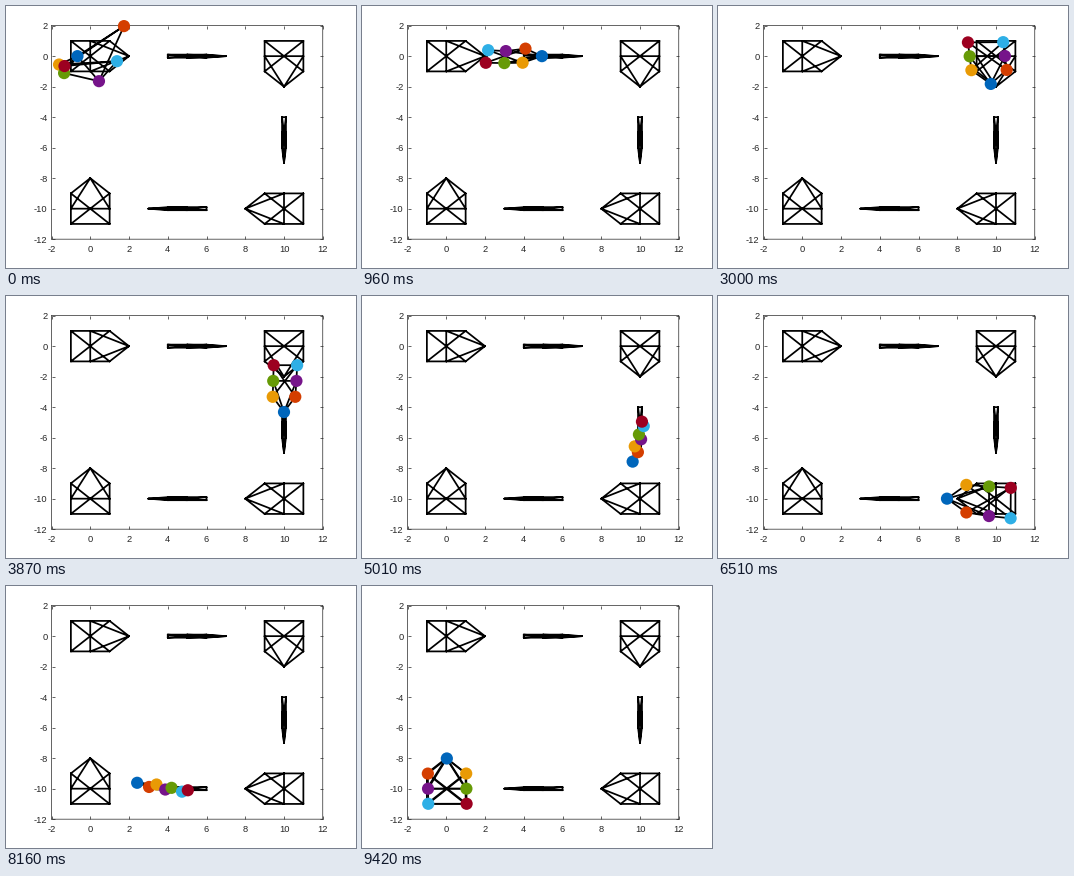
Write a matplotlib script that moves like this. It is 350 px wide and 262 px high and loops after 9.45 s.

```python
import numpy as np
import matplotlib.pyplot as plt
from matplotlib.animation import FuncAnimation

FRAMES, STEP = 315, 30
PX = 0.72  # points per pixel at 100 dpi
DECAY = 8.0
LEGS = 6
INK = "#262626"
COLORS = ["#0066bb", "#d43e00", "#e99a05", "#76148a", "#669a06", "#2eafe6", "#9c0020"]

plt.rcParams["font.family"] = "Liberation Sans"
plt.rcParams["axes.unicode_minus"] = False

# Points are complex numbers: a nose, then three left/right pairs behind it
BASE = np.array([2] + [x + 1j * y for x in (1, 0, -1) for y in (1, -1)])
EDGES = ([(0, i) for i in range(1, 5)] + [(i, i + 2) for i in range(1, 5)]
         + [(1, 6), (2, 5), (3, 4), (5, 6)])
START = np.array([-.66, 1.74 + 1.97j, -1.61 - .55j, .45 - 1.64j,
                  -1.35 - 1.11j, 1.38 - .33j, -1.33 - .65j])
# The nose and front pair lead; the others lag more the further back they are
LAG = .75 * np.sqrt(np.clip(1 - BASE.real, 0, None))


def heading(turns):
    return (-1j) ** turns


def waypoint(k):
    """Formation after k steps of 5, turning right and squeezing every other step."""
    center = sum(5 * heading(j // 2) for j in range(k))
    squeeze = .1 if k % 2 else 1
    return center + (BASE.real + 1j * squeeze * BASE.imag) * heading(k // 2)


SHAPES = np.array([waypoint(k) for k in range(LEGS + 1)])
VELOCITY = np.diff(SHAPES, axis=0)


def progress(ms):
    return np.interp(ms, [0, 5010, 6510, 8160, 9420], [0, 3.19, 4.106, 5.193, 5.99])


def agents(ms):
    u = progress(ms)
    leg = min(int(u), LEGS - 1)
    pos = SHAPES[leg] + (u - leg) * VELOCITY[leg]
    # Followers respond to each velocity jump with a damped lag
    for k in range(1, leg + 1):
        tau = u - k
        pos = pos - LAG * (VELOCITY[k] - VELOCITY[k - 1]) * tau * np.exp(-DECAY * tau)
    return pos + (START - SHAPES[0]) * (1 + DECAY * u) * np.exp(-DECAY * u)


def wires(points):
    path = np.array([p for a, b in EDGES for p in (points[a], points[b], np.nan)])
    return path.real, path.imag


fig = plt.figure(figsize=(3.5, 2.62), dpi=100, facecolor="white")
ax = fig.add_axes([.13, .11, .775, .815])
ax.set(xlim=(-2, 12), ylim=(-12, 2), xticks=range(-2, 13, 2), yticks=range(-12, 3, 2))
ax.tick_params(direction="in", top=True, right=True, length=2.7 * PX, width=.7 * PX,
               color=INK, labelcolor=INK, labelsize=9.3 * PX, pad=4 * PX)
ax.tick_params(axis="x", pad=5.5 * PX)
for spine in ax.spines.values():
    spine.set(linewidth=.7 * PX, color=INK, snap=False)
for tick in ax.get_xticklines() + ax.get_yticklines():
    tick.set_snap(False)

style = dict(color="black", lw=1.75 * PX, solid_capstyle="round")
for shape in SHAPES:
    ax.plot(*wires(shape), **style)
links, = ax.plot([], [], zorder=3, **style)
dots = ax.scatter(START.real, START.imag, s=(12.2 * PX) ** 2, c=COLORS, linewidths=0,
                  zorder=4, clip_on=False)


def draw(i):
    pos = agents(i * STEP)
    links.set_data(*wires(pos))
    dots.set_offsets(np.column_stack([pos.real, pos.imag]))
    return links, dots


anim = FuncAnimation(fig, draw, frames=FRAMES, interval=STEP, repeat=True,
                     repeat_delay=0, blit=False)
plt.show()
```
